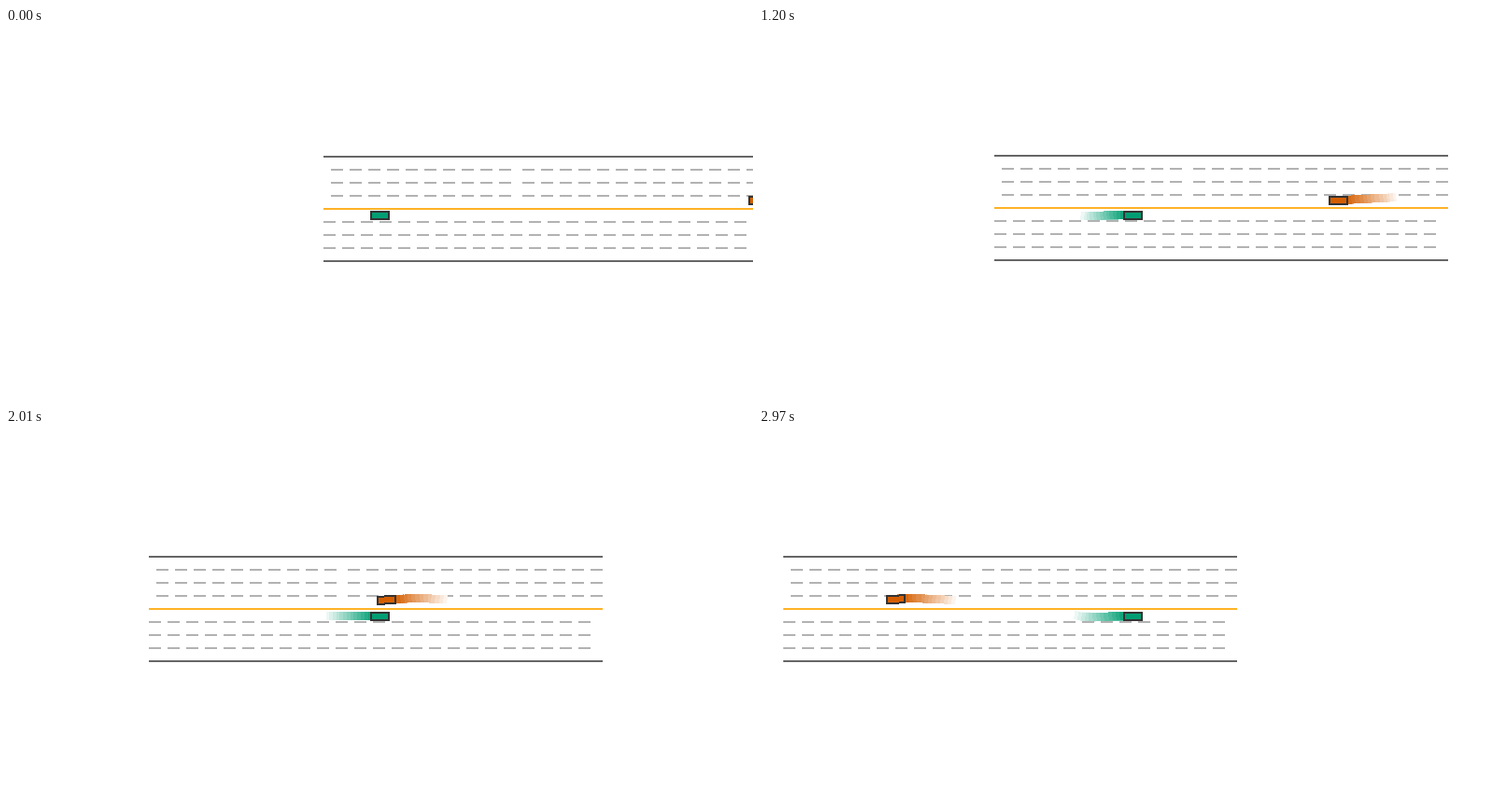
An HTML page for the animation above (3000 ms loop, 800 by 400 pixels).

```html
<!DOCTYPE html>
<html lang="en">
<head>
<meta charset="utf-8">
<title>Two cars passing</title>
<style>
  html, body { margin: 0; width: 100%; height: 100%; overflow: hidden; background: #fff; }
  svg { display: block; width: 800px; height: 400px; }
</style>
</head>
<body>
<svg id="stage" viewBox="0 0 800 400" shape-rendering="crispEdges"></svg>
<script>
const LOOP = 3000, STEP = 30, TRAIL = 14;
const LENGTH = 486, LANE = 14, DASH = 13, PERIOD = 20;
const SPEED_UP = 900;                    // both cars accelerate this long, then cruise
const SWAY_START = 420, SWAY_PERIOD = 1080;
const EGO_X = 400.5, EGO_Y = 201;

// Distance driven: a power curve from rest, then cruising with an optional slow gain.
function distance(t, run, power, speed, gain = 0) {
  const cruise = Math.max(0, t - SPEED_UP);
  return run * (Math.min(t, SPEED_UP) / SPEED_UP) ** power + speed * cruise + gain * cruise ** 2;
}

// Smooth steps through a few [time, value] keys.
function ease(keys, t) {
  const next = keys.findIndex(key => key[0] > t);
  if (next < 1) return keys[next ? keys.length - 1 : 0][1];
  const [t0, v0] = keys[next - 1], [t1, v1] = keys[next];
  const u = (t - t0) / (t1 - t0);
  return v0 + (v1 - v0) * u * u * (3 - 2 * u);
}

// The camera follows the green car, so its driving moves the road.
const steering = [[300, 194], [900, 192], [1140, 193], [2220, 193], [2400, 194], [2700, 192], [2960, 193]];
const egoDistance = t => distance(t, 52.2, 1.97, 0.1166, 4.72e-6);
const centreLine = t => ease(steering, t);
const roadX = t => Math.round(340 - egoDistance(t));
const roadY = t => Math.round(centreLine(t));

function egoTilt(t) {
  const forward = egoDistance(t + 1) - egoDistance(t);
  const sideways = centreLine(t) - centreLine(t + 1);
  return Math.atan2(sideways, forward) * 180 / Math.PI;
}

// The orange car sways gently in its lane.
const swayPhase = t => 2 * Math.PI * (t - SWAY_START) / SWAY_PERIOD;
const swayAmount = t => Math.min(1, t / SWAY_START);

const cars = [
  {
    color: [2, 158, 115],
    x: t => EGO_X - roadX(t),
    y: t => EGO_Y - roadY(t),
    tilt: egoTilt
  },
  {
    color: [213, 94, 0],
    x: t => 465.5 - Math.round(distance(t, 55, 1.92, 0.1402)),
    y: t => -9.4 - 1.25 * swayAmount(t) * Math.sin(swayPhase(t)),
    tilt: t => 3.5 * swayAmount(t) * Math.cos(swayPhase(t))
  }
];

function add(parent, name, attributes = {}) {
  const node = document.createElementNS('http://www.w3.org/2000/svg', name);
  for (const key in attributes) node.setAttribute(key, attributes[key]);
  parent.appendChild(node);
  return node;
}

const stage = document.getElementById('stage');
const road = add(stage, 'g');

function drawLine(lane, color, from = 0, width = LENGTH) {
  add(road, 'rect', { x: from, y: lane * LANE - 1, width, height: 2, fill: color });
}

function drawRoad() {
  for (let lane = 1; lane <= 3; lane++) {
    for (let i = 0; i < 24; i++) {
      const gap = i < 14 ? 0 : 5;
      drawLine(-lane, '#b2b2b2', LENGTH - DASH - PERIOD * i - gap, DASH);
      drawLine(lane, '#b2b2b2', PERIOD * i, DASH);
    }
  }
  drawLine(-4, '#666');
  drawLine(4, '#666');
  drawLine(0, '#ffb226');
}

function fade(color, amount) {
  return `rgb(${color.map(c => Math.round(255 + (c - 255) * amount))})`;
}

function buildCar(car) {
  car.ghosts = [];
  for (let age = TRAIL - 1; age > 0; age--) {
    const node = add(stage, 'rect', {
      x: -10, y: -5, width: 20, height: 9, fill: fade(car.color, 1 - age / TRAIL)
    });
    car.ghosts.push({ node, age });
  }
  car.body = add(stage, 'rect', {
    x: -9.5, y: -4, width: 19, height: 8,
    fill: fade(car.color, 1), stroke: '#333', 'stroke-width': 2
  });
}

function place(node, car, moment, now) {
  const x = car.x(moment) + roadX(now), y = car.y(moment) + roadY(now);
  node.setAttribute('transform', `translate(${x} ${y}) rotate(${car.tilt(moment)})`);
}

function render(time) {
  const now = Math.floor(time % LOOP / STEP) * STEP;
  road.setAttribute('transform', `translate(${roadX(now)} ${roadY(now)})`);
  for (const car of cars) {
    for (const { node, age } of car.ghosts) {
      place(node, car, Math.max(0, now - age * STEP), now);
      node.setAttribute('visibility', now < age * STEP ? 'hidden' : 'visible');
    }
    place(car.body, car, now, now);
  }
}

drawRoad();
cars.forEach(buildCar);
const start = performance.now();
function tick() {
  render(performance.now() - start);
  requestAnimationFrame(tick);
}
tick();
</script>
</body>
</html>
```
